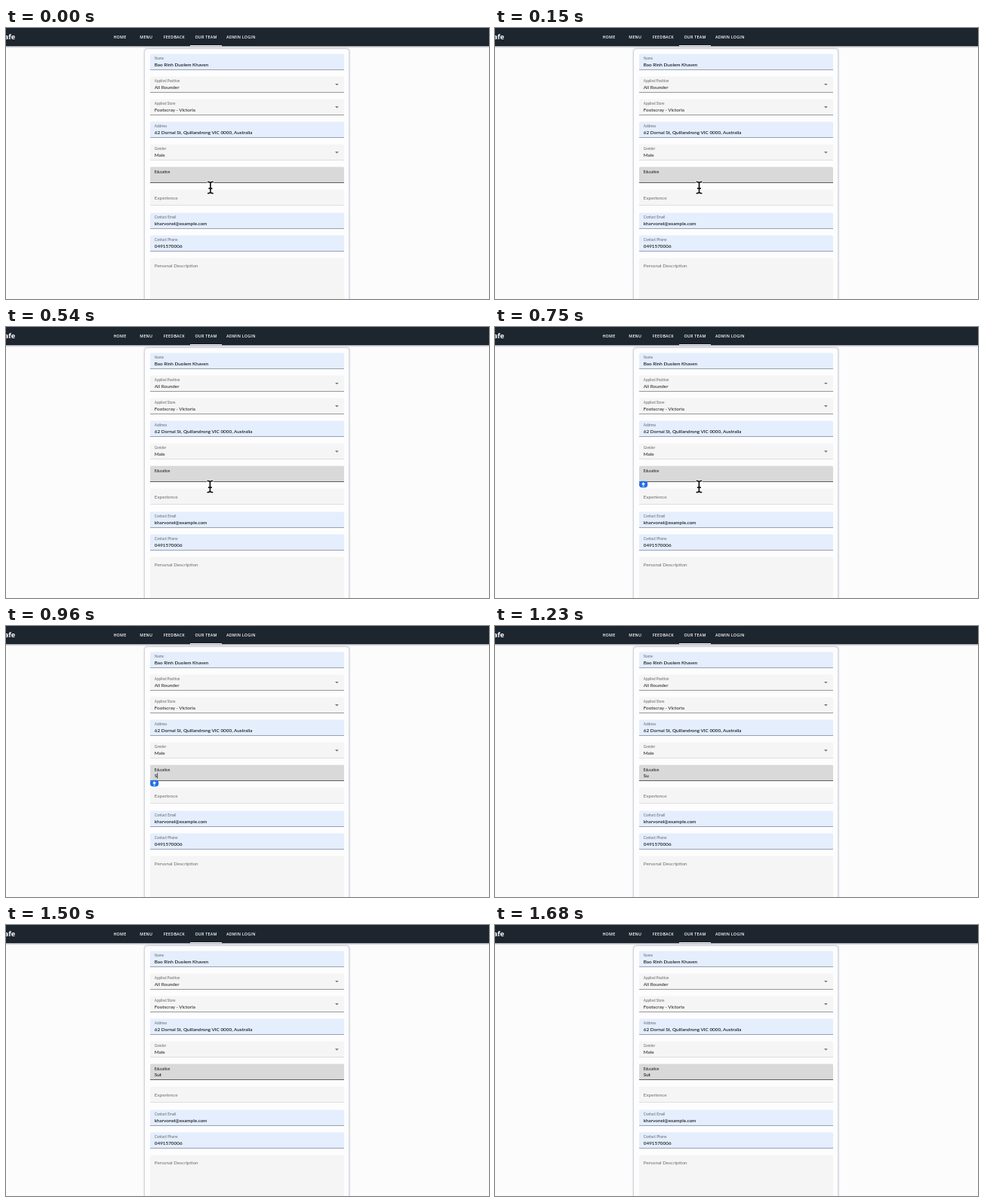
An HTML page that plays this animation: 640x360 px, repeating every 1710 ms.

```html
<!DOCTYPE html>
<html lang="en">
<head>
<meta charset="utf-8">
<title>Application form</title>
<style>
  html, body { margin: 0; width: 100%; height: 100%; overflow: hidden; background: #fcfcfd; }
  svg { display: block; width: 640px; height: 360px; }
  text { font-family: Lato, "Open Sans", sans-serif; font-size: 6.35px; white-space: pre; }
  .label { font-size: 4.7px; fill: #666; }
  .value { fill: #0c0c0c; font-weight: 500; }
  .hint { fill: #6c6c6c; }
  .nav, .brand { font-family: "Open Sans", "Noto Sans", sans-serif; fill: #fff; }
  .nav { font-size: 5.3px; letter-spacing: .24px; font-weight: 600; }
  .brand { font-size: 9.2px; font-weight: 700; }
</style>
</head>
<body>
<svg id="stage" viewBox="0 0 640 360">
  <defs>
    <filter id="soft" x="-10%" y="-10%" width="120%" height="130%"><feGaussianBlur stdDeviation="1.1"/></filter>
  </defs>
  <rect width="640" height="360" fill="#fcfcfd"/>
  <rect x="183.5" y="27.5" width="271.5" height="350" rx="4" fill="#a9b0bf" filter="url(#soft)"/>
  <rect x="184" y="28" width="270.3" height="350" rx="4" fill="#fdfdfe"/>
  <rect x="-5" y="14" width="650" height="10.8" fill="#4c535d" opacity=".7" filter="url(#soft)"/>
  <rect width="640" height="24" fill="#1d252f"/>
  <rect x="244" y="23" width="42" height="1" fill="#fff"/>
  <g id="nav"></g>
  <g id="form"></g>
  <text id="typed" class="value" x="196.8" y="201.4"></text>
  <rect id="caret" y="195.2" width=".7" height="7.6" fill="#222"/>
  <g id="badge">
    <rect x="191" y="204.8" width="11.2" height="8.4" rx="3.6" fill="#1f6fe8"/>
    <path d="M196.6 206.2l2.5 2.6h-1.3v1.5h-2.4v-1.5h-1.3zM195.4 210.9h2.4v.9h-2.4z" fill="#fff"/>
  </g>
  <g id="pointer" fill="none" stroke-linecap="round">
    <path id="beamEdge" stroke="#fff" stroke-width="3.2"/>
    <path id="beam" stroke="#111" stroke-width="1.7"/>
  </g>
</svg>
<script>
const LOOP = 1710;
const PITCH = 30.13;
const $ = id => document.getElementById(id);

function add(parent, tag, attrs, content = '') {
  const node = document.createElementNS('http://www.w3.org/2000/svg', tag);
  for (const key in attrs) node.setAttribute(key, attrs[key]);
  node.textContent = content;
  parent.appendChild(node);
  return node;
}

const write = (parent, kind, x, y, content) =>
  add(parent, 'text', { class: kind, x, y }, content);

const styles = {
  filled: { fill: '#e4eefd', line: '#98a1b2' },
  select: { fill: '#f5f5f5', line: '#98989c' },
  faint: { fill: '#f5f5f5', line: '#dedee1' },
  focus: { fill: '#d9d9d9', line: '#5c5c5c' }
};

const fields = [
  { look: 'filled', label: 'Name', value: 'Bao Rinh Duolem Khaven' },
  { look: 'select', label: 'Applied Position', value: 'All Rounder', arrow: true },
  { look: 'select', label: 'Applied Store', value: 'Footscray - Victoria', arrow: true },
  { look: 'filled', label: 'Address', value: '62 Dornal St, Quillandrong VIC 0000, Australia' },
  { look: 'faint', label: 'Gender', value: 'Male', arrow: true },
  { look: 'focus', label: 'Education' },
  { look: 'faint', hint: 'Experience' },
  { look: 'filled', label: 'Contact Email', value: 'kharvonel@example.com' },
  { look: 'filled', label: 'Contact Phone', value: '0491570006' },
  { look: 'faint', hint: 'Personal Description', height: 80 }
];

function drawField({ look, label, value, hint, arrow, height = 22 }, index) {
  const form = $('form');
  const y = 34.2 + index * PITCH;
  const top = Math.floor(y);
  const bottom = top + height;
  const { fill, line } = styles[look];
  add(form, 'path', { d: `M191 ${bottom}V${top + 2}q0-1.6 1.6-1.6H446.4q1.6 0 1.6 1.6V${bottom}z`, fill });
  add(form, 'rect', { x: 191, y: bottom - 1, width: 257, height: 1, fill: line });
  if (label) {
    const node = write(form, 'label', 196.8, y + 7.7, label);
    if (look === 'focus') node.style.fill = '#111';
  }
  if (value) {
    const node = write(form, 'value', 196.8, y + 16.7, value);
    if (look !== 'filled') node.style.fill = '#2a2a2a';
  }
  if (hint) write(form, 'hint', 196.8, y + 12.9, hint);
  if (arrow) add(form, 'path', { d: `M436 ${y + 9.6}h4.8l-2.4 2.4z`, fill: '#77777b' });
}

fields.forEach(drawField);

[['HOME', 142.4], ['MENU', 177.3], ['FEEDBACK', 208.8], ['OUR TEAM', 250.4], ['ADMIN LOGIN', 292]]
  .forEach(([name, x]) => write($('nav'), 'nav', x, 13.7, name));
write($('nav'), 'brand', 12.2, 15.2, 'afe').setAttribute('text-anchor', 'end');

const beamPath = 'M-3.2-7.6Q-.5-7.6 0-6Q.5-7.6 3.2-7.6M0-6V6M-3.2 7.6Q-.5 7.6 0 6Q.5 7.6 3.2 7.6M-1.8 1.2H1.8';
$('beam').setAttribute('d', beamPath);
$('beamEdge').setAttribute('d', beamPath);

const keys = [[780, 'S'], [1140, 'u'], [1380, 't']];
const show = (id, on) => $(id).setAttribute('visibility', on ? 'visible' : 'hidden');

function render(t) {
  const text = keys.filter(([at]) => t >= at).map(([, key]) => key).join('');
  const typed = $('typed');
  if (typed.textContent !== text) typed.textContent = text;
  $('caret').setAttribute('x', 196.9 + (text ? typed.getComputedTextLength() : 0));
  show('caret', t >= 780 && t < 1200);
  show('badge', t >= 720 && t < 1080);
  show('pointer', t < 780);
  $('pointer').setAttribute('transform', `translate(${270.9 - .5 * Math.min(1, t / 200)} 212)`);
}

function tick() {
  render(performance.now() % LOOP);
  requestAnimationFrame(tick);
}
tick();
</script>
</body>
</html>
```
